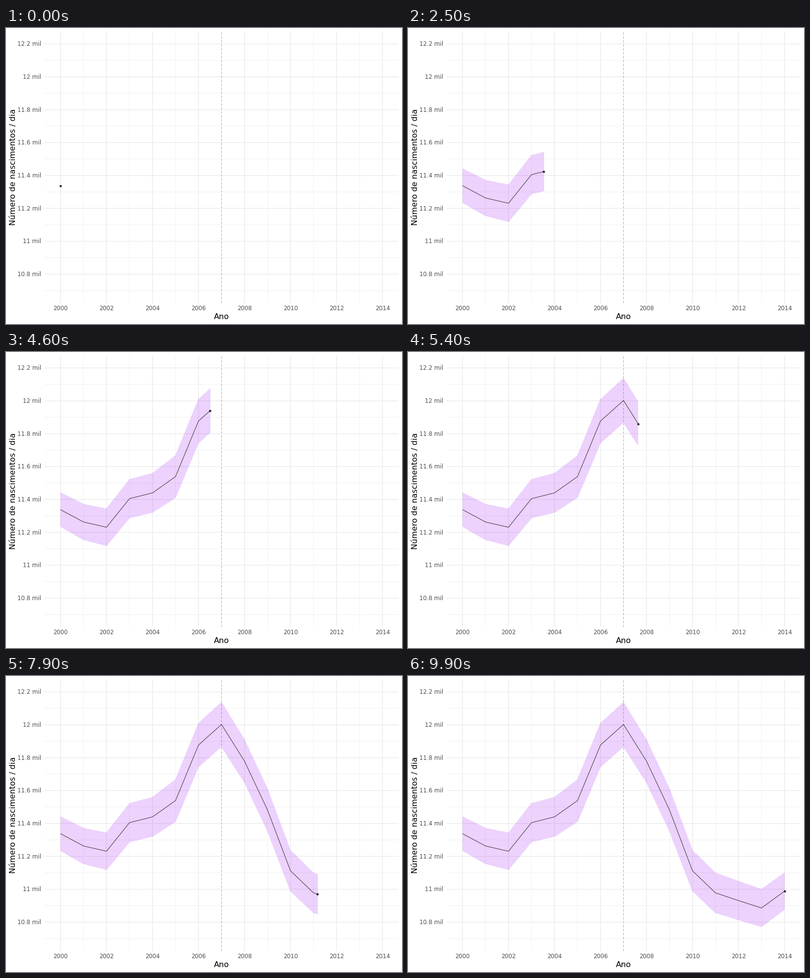
A matplotlib script that plays this animation: 800 px wide and 600 px high, repeating every 10 s.

```python
import numpy as np
import matplotlib.pyplot as plt
from matplotlib.animation import FuncAnimation
from matplotlib.patches import Polygon

W, H, FRAMES = 800, 600, 100
LEFT, RIGHT, TOP, BOTTOM = 77.6, 793.1, 7.3, 557.2
PT = 0.72  # points per pixel at 100 dpi

years = np.arange(2000, 2015)
births = np.array([11338, 11263, 11231, 11405, 11440, 11539, 11877, 12002,
                   11779, 11482, 11112, 10978, 10931, 10886, 10988])
margin = np.array([103, 108, 112, 117, 119, 127, 132, 134,
                   130, 128, 123, 121, 117, 114, 111])

plt.rcParams["font.family"] = "DejaVu Sans"
fig = plt.figure(figsize=(W / 100, H / 100), dpi=100, facecolor="white")
ax = fig.add_axes([LEFT / W, 1 - BOTTOM / H, (RIGHT - LEFT) / W, (BOTTOM - TOP) / H])
ax.set_xlim(1999.3, 2014.7)
ax.set_ylim(10625, 12275)
ax.axis("off")


def label(x, y, text, size, color, **kw):
    fig.text(x / W, 1 - y / H, text, fontsize=size * PT, color=color,
             va="baseline", **kw)


def to_px(year, value):
    return (LEFT + (year - 1999.3) / 15.4 * (RIGHT - LEFT),
            TOP + (12275 - value) / 1650 * (BOTTOM - TOP))


def grid(draw, values, width):
    for v in values:
        draw(v, color="#ebebeb", lw=width * PT, snap=False,
             solid_capstyle="butt", zorder=1)


grid(ax.axhline, range(10700, 12200, 200), 0.71)
grid(ax.axvline, range(2001, 2014, 2), 0.71)
grid(ax.axhline, range(10800, 12201, 200), 1.42)
grid(ax.axvline, range(2000, 2015, 2), 1.42)
ax.axvline(2007, color="#a6a6a6", lw=PT, ls=(0, (4, 4)), snap=False,
           dash_capstyle="butt", zorder=2)

for year in range(2000, 2015, 2):
    label(to_px(year, 0)[0], 572.4, str(year), 11.73, "#4d4d4d", ha="center")
for value in range(10800, 12201, 200):
    label(71.3, to_px(2000, value)[1] + 4.1, f"{value / 1000:g} mil", 11.73,
          "#4d4d4d", ha="right")
label((LEFT + RIGHT) / 2, 589.8, "Ano", 16, "black", ha="center")
label(19.4, (TOP + BOTTOM) / 2, "Número de nascimentos / dia", 16, "black",
      ha="center", rotation=90, rotation_mode="anchor")

band = Polygon(np.zeros((3, 2)), closed=True, fc=(160 / 255, 32 / 255, 240 / 255, 0.2),
               ec="none", lw=0, antialiased=False, zorder=3)
ax.add_patch(band)
line, = ax.plot([], [], color="black", alpha=0.7, lw=1.1 * PT, zorder=4,
                solid_capstyle="butt", solid_joinstyle="round")
dot, = ax.plot([], [], "o", color="black", alpha=0.8, ms=4.6 * PT, mew=0,
               zorder=5, clip_on=False)
dot.set_snap(False)


def update(i):
    now = 2000 + 14 * i / (FRAMES - 1)
    x = np.append(years[years < now], now)
    y = np.interp(x, years, births)
    m = np.interp(x, years, margin)
    line.set_data(x, y)
    dot.set_data(x[-1:], y[-1:])
    band.set_visible(i > 0)
    band.set_xy(np.column_stack([np.r_[x, x[::-1]], np.r_[y + m, (y - m)[::-1]]]))
    return band, line, dot


anim = FuncAnimation(fig, update, frames=FRAMES, interval=100,
                     init_func=lambda: update(0), repeat=True, repeat_delay=0)
plt.show()
```
